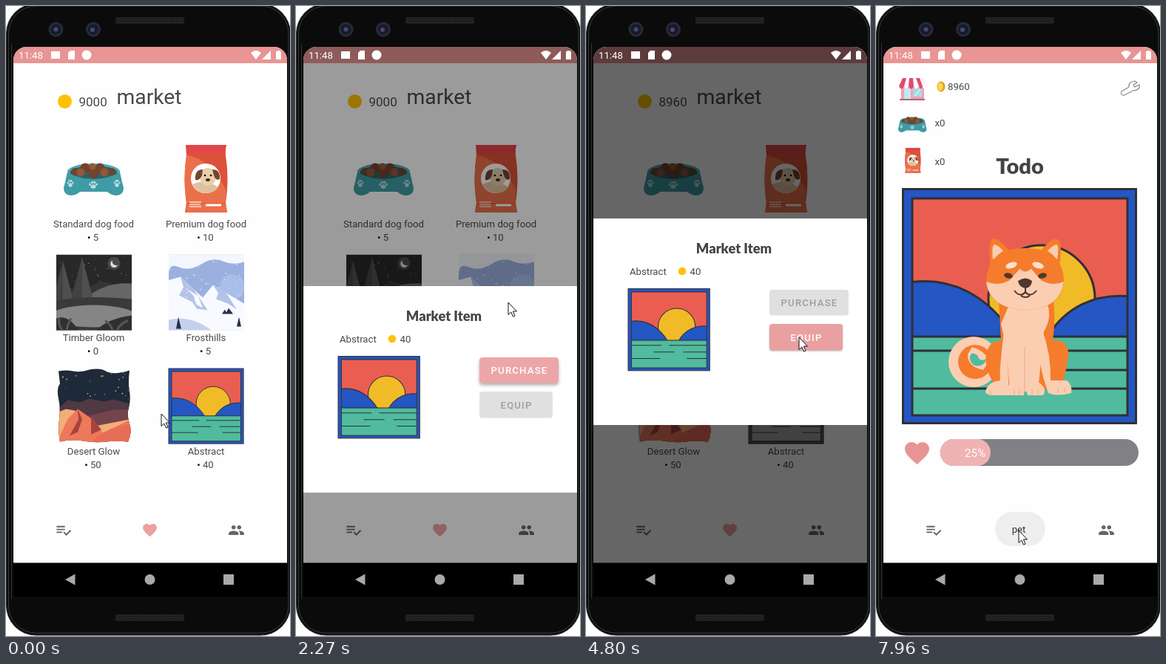
Recreate the animation shown at these times as an HTML page. Size 384 px wide and 848 px high, loop 7.99 s.

```html
<!DOCTYPE html>
<html lang="en">
<head>
<meta charset="utf-8">
<title>Pet market</title>
<style>
html, body { margin: 0; width: 100%; height: 100%; overflow: hidden; background: #fff; }
svg { display: block; width: 100vw; height: 100vh; }
text { font: 13.2px Roboto, sans-serif; fill: #4a4a4a; }
.mid { text-anchor: middle; }
.hand { font: 900 18.3px Lato, sans-serif; fill: #444; }
.btn rect { fill: #eaa0a1; filter: drop-shadow(0 1px 1px rgba(0,0,0,.28)); }
.btn text { font-weight: 500; letter-spacing: 1.18px; fill: #fff; }
.btn.press rect { fill: #eda6a7; filter: drop-shadow(0 3px 2px rgba(0,0,0,.3)); }
.btn.off rect { fill: #e0e0e0; filter: none; }
.btn.off text { fill: #9d9d9d; }
.owned { filter: grayscale(1); }
</style>
</head>
<body>
<svg viewBox="0 0 384 848" preserveAspectRatio="none">
<defs>
  <clipPath id="screen"><path d="M10 795V73A18 18 0 0 1 28 55H362A18 18 0 0 1 380 73V795Z"/></clipPath>
  <clipPath id="square"><rect width="102" height="102"/></clipPath>
  <clipPath id="pane"><rect x="14" y="14" width="291" height="292"/></clipPath>
  <clipPath id="torn"><path d="M2 3Q12 1 22 3T44 1T66 3T98 2Q96 18 98 30T97 52T98 74T96 98Q80 96 66 98T36 97T4 98Q1 82 3 68T2 40T4 20Z"/></clipPath>
  <clipPath id="track"><rect x="87" y="583" width="268" height="36" rx="18"/></clipPath>
  <pattern id="mesh" width="3" height="3" patternUnits="userSpaceOnUse"><rect width="3" height="3" fill="#1c1c1c"/><circle cx="1" cy="1" r=".8" fill="#333"/></pattern>

  <path id="heart" d="M12 21.35l-1.45-1.32C5.4 15.36 2 12.28 2 8.5 2 5.42 4.42 3 7.5 3c1.74 0 3.41.81 4.5 2.09C13.09 3.81 14.76 3 16.5 3 19.58 3 22 5.42 22 8.5c0 3.78-3.4 6.86-8.55 11.54z"/>
  <g id="paw"><ellipse cy="2" rx="3.6" ry="2.8"/><circle cx="-4.5" cy="-1" r="1.6"/><circle cx="-1.7" cy="-3.6" r="1.7"/><circle cx="1.7" cy="-3.6" r="1.7"/><circle cx="4.5" cy="-1" r="1.6"/></g>

  <g id="bowl">
    <path d="M6 10L0 34Q0 43 9 44Q17 44 22 39H59Q64 44 72 44Q81 43 81 34L75 10Z" fill="#3f9ba4"/>
    <ellipse cx="40.5" cy="12" rx="35.500" ry="11" fill="#4fa9b1"/>
    <ellipse cx="40.5" cy="13" rx="32" ry="9" fill="#29646d"/>
    <g fill="#73432c"><circle cx="15" cy="12" r="5"/><circle cx="29" cy="7" r="6.500"/><circle cx="49" cy="7" r="6.500"/><circle cx="65" cy="12" r="5"/><circle cx="40" cy="14" r="7"/></g>
    <g fill="#94573a"><circle cx="23" cy="13" r="5.500"/><circle cx="39" cy="5" r="4.500"/><circle cx="55" cy="13" r="5.500"/></g>
    <path d="M5 13Q40 31 76 13L78 22Q40 38 3 22Z" fill="#3f9ba4"/>
    <g fill="#b5dde0"><use href="#paw" x="40" y="30"/><use href="#paw" transform="translate(9 28) scale(.75 1)"/><use href="#paw" transform="translate(72 28) scale(.75 1)"/></g>
  </g>

  <g id="bag">
    <path d="M2 0H57Q55 8 56 14Q61 45 56 78L58 91H1L3 78Q-2 45 3 14Z" fill="#dc5139"/>
    <path d="M3 14Q34 18 56 60V78L58 91H1L3 78Q-2 45 3 14Z" fill="#ea704b"/>
    <path d="M2 0H57Q55 6 56 11H3Q4 6 2 0Z" fill="#e24648"/>
    <path d="M3 79H56" stroke="#c9472f" stroke-width=".7"/>
    <circle cx="29" cy="45" r="20" fill="#fff"/>
    <path d="M11 53Q29 45 46 57Q40 65 29 65T11 53Z" fill="#e0c19d"/>
    <ellipse cx="32" cy="43" rx="11" ry="12" fill="#e9cfac"/>
    <path d="M25 33Q14 33 15 47Q20 49 24 41ZM38 33Q49 33 48 46Q43 49 40 41Z" fill="#74452f"/>
    <circle cx="28" cy="41" r="1.3"/><circle cx="36" cy="41" r="1.3"/><ellipse cx="32" cy="47" rx="3" ry="2" fill="#442d25"/>
    <path d="M7 77H23M7 80H22M7 83H23" stroke="#ffd9cb" stroke-width="1.4"/><path d="M29 81H50" stroke="#fff" stroke-width="3"/>
  </g>

  <g id="night" clip-path="url(#square)">
    <rect width="102" height="102" fill="#282828"/>
    <g id="stars" fill="#aaa"></g>
    <circle cx="78" cy="12" r="8.500" fill="#494949"/><path d="M76 8A5 5 0 1 0 83 14A5 5 0 0 1 76 8Z" fill="#ddd"/>
    <path d="M0 48L12 40L30 52L60 36L102 46V102H0Z" fill="#353535"/>
    <path d="M36 62Q64 36 102 39V68H36Z" fill="#666"/>
    <path d="M9 9L25 68H-6ZM35 4L52 68H18Z" fill="#4f4f4f"/><path d="M9 9V68H-6ZM35 4V68H18Z" fill="#424242"/>
    <path d="M0 62Q45 54 102 60V102H0Z" fill="#3a3a3a"/>
    <ellipse cx="50" cy="83" rx="58" ry="15" fill="#858585"/>
    <path d="M0 86Q16 80 30 102H0ZM54 102Q70 86 102 82V102Z" fill="#303030"/>
    <path d="M8 102Q2 92 4 86M14 102Q16 92 20 86M76 102Q73 93 66 89M82 102Q87 92 97 89" stroke="#555" stroke-width="3" fill="none"/>
  </g>

  <g id="winter" clip-path="url(#square)">
    <rect width="102" height="102" fill="#9bb0df"/>
    <path d="M0 0H102V10Q86 15 73 9T44 13T14 17T0 26Z" fill="#f3f6fc"/>
    <circle cx="86" cy="44" r="17" fill="#a9bee8"/>
    <path d="M-5 36L16 30L34 47L46 58L60 41L78 52L102 66V102H-5Z" fill="#f8faff"/>
    <path d="M16 30L20 44L14 55L32 64L40 76L56 80L34 47ZM60 41L67 52L64 60L80 66L92 74L78 52Z" fill="#b3c3e8"/>
    <path d="M24 46L34 56L37 67L46 72L40 56Z" fill="#f8faff"/>
    <path d="M0 72Q40 70 102 84V102H0Z" fill="#f8faff"/>
    <path d="M0 88Q30 81 58 102H0Z" fill="#c4d0ec"/>
    <g id="snow" fill="#fff" opacity=".8"></g>
    <path d="M10 100L13 84L17 100ZM72 80L76 74L78 78L81 72L87 80ZM92 97L95 84L98 97Z" fill="#253148"/>
  </g>

  <g id="canyon" clip-path="url(#torn)">
    <rect width="102" height="102" fill="#1e293a"/>
    <g id="sparks" fill="#f2ca68"></g>
    <path d="M0 56L14 42L31 45L44 40L63 44L76 41L102 48V102H0Z" fill="#503943"/>
    <path d="M40 64L55 60L77 55L102 54V102H40Z" fill="#75434a"/>
    <path d="M0 59L12 54L24 56L46 78L102 67V102H0Z" fill="#f2ae79"/>
    <path d="M0 99L14 68L28 54L44 65L62 86L102 67V102H0Z" fill="#ec7959"/>
    <path d="M28 54L34 68L28 85L17 90L29 68ZM46 64L60 82L46 88Z" fill="#a7443e"/>
    <path d="M42 102Q68 76 102 75V102Z" fill="#e86d59"/>
  </g>

  <g id="abstract" stroke="#303036" stroke-width="3">
    <rect x="1.500" y="1.500" width="315" height="315" fill="#2456c4"/>
    <g clip-path="url(#pane)">
      <rect width="318" height="318" fill="#ea5e51"/>
      <circle cx="189" cy="149" r="72" fill="#f1bb27"/>
      <path d="M10 127C65 119 115 142 154 202H10Z" fill="#2456c4"/>
      <path d="M196 202C220 160 262 141 310 146V202Z" fill="#2456c4"/>
      <rect x="5" y="200" width="310" height="130" fill="#50bb9e"/>
      <path d="M14 219H130M160 219H305M100 245H180M215 245H305M14 270H125M228 270H305"/>
    </g>
    <rect x="14" y="14" width="291" height="292" fill="none"/>
  </g>

  <g id="dog">
    <circle cx="132" cy="479" r="34" fill="#fbceb2"/>
    <circle cx="134" cy="479" r="23" fill="#f57c2c"/>
    <path d="M130 459Q147 464 153 477L145 490Q123 485 124 469Z" fill="#fbceb2"/>
    <path d="M127 472A11 11 0 1 0 149 475Q140 480 137 470Q129 464 127 472Z" fill="#50bb9e"/>
    <path d="M166 394H240Q243 425 239 450Q262 449 260 472Q257 491 252 510L224 518L181 519L160 509Q143 484 151 462Q157 449 169 451Z" fill="#f57c2c"/>
    <path d="M180 402H232Q238 420 227 438L219 519H181Q176 452 169 428Z" fill="#fbceb2"/>
    <path d="M174 431Q166 492 168 504Q151 506 148 519Q148 524 160 524H180Q178 484 176 450ZM224 434Q237 468 236 504H258Q266 510 264 521Q244 526 233 521Q225 499 222 480Z" fill="#fbceb2"/>
    <path d="M180 510Q171 523 182 524H200Q201 518 201 480Q202 518 205 524H226Q232 514 220 507Z" fill="#fbceb2"/>
    <path d="M201 458V519M187 516V523M194 516V523M211 516V523M219 516V523M155 517V523M246 515V521M255 514V520" stroke="#edb294" stroke-width="1.300"/>
    <path d="M155 350Q151 315 159 313Q168 313 181 331ZM248 350Q253 316 245 314Q236 312 222 331Z" fill="#f57c2c"/>
    <path d="M158 341Q156 322 160 321Q167 322 174 333ZM245 341Q248 322 244 321Q236 323 230 333Z" fill="#fbceb2"/>
    <path d="M170 331Q202 321 234 331Q255 346 254 374Q248 408 202 409Q155 408 149 374Q148 346 170 331Z" fill="#f57c2c"/>
    <path d="M149 371Q165 378 181 369L194 354Q202 349 210 354L223 369Q239 378 254 371Q249 408 202 409Q154 408 149 371Z" fill="#fbceb2"/>
    <path d="M194 353Q202 362 210 353V344H194Z" fill="#f57c2c"/>
    <g fill="#fbe0d0"><ellipse cx="183" cy="349" rx="8" ry="4" transform="rotate(-18 183 349)"/><ellipse cx="219" cy="349" rx="8" ry="4" transform="rotate(18 219 349)"/></g>
    <g fill="#4e382f"><ellipse cx="179" cy="363" rx="6" ry="3.500" transform="rotate(12 179 363)"/><ellipse cx="225" cy="363" rx="6" ry="3.500" transform="rotate(-12 225 363)"/><path d="M192 370Q202 363 211 370Q210 379 202 380Q193 378 192 370Z"/></g>
    <path d="M187 383Q195 393 202 385Q209 393 217 383M202 379V386M196 390Q202 394 208 390" fill="none" stroke="#4e382f" stroke-width="2"/>
  </g>

  <g id="shop">
    <rect x="3" y="10" width="31" height="20" fill="#f2a0b5"/>
    <rect x="7" y="14" width="9" height="16" fill="#c4e8ef"/><rect x="19" y="14" width="12" height="11" fill="#a6dbe8"/><path d="M21 24L29 15" stroke="#fff"/>
    <rect x="1" y="28" width="34" height="2" fill="#a86c7d"/>
    <path d="M5 0H31L36 11H0Z" fill="#e3496f"/>
    <path d="M10 0H14L13 11H7ZM19 0H23L27 11H20ZM28 0H31L36 11H32Z" fill="#fff"/>
    <path d="M0 11H7Q3.500 18 0 11ZM13 11H20Q16.500 18 13 11ZM27 11H32Q30 18 27 11Z" fill="#e3496f"/>
    <path d="M7 11H13Q10 18 7 11ZM20 11H27Q23.500 18 20 11ZM32 11H36Q34 18 32 11Z" fill="#fff"/>
  </g>
</defs>

<rect width="384" height="848" fill="#fff"/>
<rect x=".5" y="-3" width="384" height="850" rx="40" fill="#0b0b0b" stroke="#2d2d2d"/>
<rect x="3.500" y="0" width="378.500" height="844" rx="37" fill="none" stroke="#3c3c3c"/>
<path d="M7.500 50V798" stroke="#333"/>
<rect x="148" y="15" width="93" height="9" rx="2" fill="url(#mesh)"/><rect x="148" y="819" width="93" height="9" rx="2" fill="url(#mesh)"/>
<g stroke="#292a36" stroke-width="3" fill="#171a2e"><circle cx="67.500" cy="31.500" r="8.500"/><circle cx="118" cy="31.500" r="8.500"/></g>
<g fill="#454b6b"><circle cx="67.500" cy="31.500" r="3"/><circle cx="117" cy="32" r="3"/></g>

<g clip-path="url(#screen)">
  <rect x="10" y="55" width="370" height="695" fill="#fefefe"/>
  <rect x="10" y="55" width="370" height="22" fill="#e89594"/>
  <rect x="10" y="749.500" width="370" height="46"/>

  <g id="market">
    <circle cx="79.500" cy="128.500" r="9.500" fill="#ffc107"/>
    <text class="coins" x="98.500" y="135" style="font-size:17px"></text>
    <text x="149.500" y="132" style="font-size:28.300px">market</text>
    <use href="#bowl" x="78" y="211"/>
    <use href="#bag" x="241" y="187"/>
    <use href="#night" x="68" y="334.500"/>
    <use href="#winter" x="220" y="334.500"/>
    <use href="#canyon" x="69" y="488.500"/>
    <use id="thumb" href="#abstract" transform="translate(219.500 487.500) scale(.321)"/>
    <g id="labels"></g>
  </g>

  <g id="home">
    <use href="#shop" x="31" y="97"/>
    <ellipse cx="88" cy="108.500" rx="5.500" ry="7" fill="#dda520"/><ellipse cx="87" cy="108.500" rx="3.500" ry="5.500" fill="#ffd54d"/>
    <text class="coins" x="97" y="113"></text>
    <path d="M332 115L342 109Q341 102 350 101L353 103L348 106L350 109L356 106Q358 113 347 114L336 120Q330 121 332 115Z" fill="#fff" stroke="#888" stroke-width="1.200"/>
    <use href="#bowl" transform="translate(30 149) scale(.475)"/>
    <use href="#bag" transform="translate(39 191) scale(.37)"/>
    <text x="79.500" y="161.500">x0</text><text x="79.500" y="213.500">x0</text>
    <text class="hand mid" x="194.500" y="226" style="font-size:29px">Todo</text>
    <use href="#abstract" x="35" y="245"/>
    <use href="#dog"/>
    <use href="#heart" transform="translate(35.700 582) scale(1.650)" fill="#e99494"/>
    <g clip-path="url(#track)">
      <rect x="87" y="583" width="268" height="36" fill="#808085"/>
      <rect id="fill" x="87" y="583" height="36" rx="18" fill="#f0b3b3"/>
      <text id="percent" y="607" style="font-size:15.100px;fill:#fff">25%</text>
    </g>
  </g>

  <g fill="#666">
    <path transform="translate(66.500 694.200) scale(.943)" d="M14 10H2v2h12zm0-4H2v2h12zM2 16h8v-2H2zm19.500-4.500L23 13l-6.990 7-4.510-4.500L13 14l3.010 3z"/>
    <use href="#heart" transform="translate(183.200 694.200) scale(.943)" fill="#eba1a1"/>
    <path transform="translate(300.200 694.200) scale(.943)" d="M16 11c1.660 0 3-1.340 3-3s-1.340-3-3-3-3 1.340-3 3 1.340 3 3 3zm-8 0c1.660 0 3-1.340 3-3S9.660 5 8 5 5 6.340 5 8s1.340 3 3 3zm0 2c-2.330 0-7 1.170-7 3.500V19h14v-2.500c0-2.330-4.670-3.500-7-3.500zm8 0l-.97.05c1.160.84 1.970 1.970 1.970 3.450V19h6v-2.500c0-2.330-4.670-3.500-7-3.500z"/>
  </g>

  <rect id="dim" x="10" y="55" width="370" height="740"/>
  <g id="dialog">
    <rect x="10" width="370" height="278" fill="#fff"/>
    <text class="hand mid" x="200" y="47">Market Item</text>
    <text x="59" y="75.500">Abstract</text>
    <circle cx="130" cy="71" r="5.300" fill="#ffc107"/><text x="140.500" y="75.500">40</text>
    <use href="#abstract" transform="translate(56.500 94) scale(.35)"/>
    <g id="buy" class="btn"><rect x="248" y="96" width="107" height="34.500" rx="4"/><text class="mid" x="302" y="118">PURCHASE</text></g>
    <g id="equip" class="btn"><rect x="248" y="142" width="99" height="35.500" rx="4"/><text class="mid" x="298" y="164.500">EQUIP</text></g>
  </g>

  <g fill="#fff">
    <text x="17" y="71" style="fill:#fff">11:48</text>
    <rect x="61" y="61" width="12" height="10"/>
    <path d="M87 60H93V72H84V63Z"/><circle cx="109" cy="66" r="6.500"/>
    <path d="M331 63Q338 57 345 63L338 72ZM358 60V72H346ZM365 61H367V60H370V61H372V72H365Z"/>
  </g>
  <g fill="#a9a9a9"><path d="M80 772L93.500 764.500V779.500Z"/><circle cx="194.500" cy="772" r="7"/><rect x="294" y="765" width="14" height="14"/></g>

  <g id="bought"><rect x="99" y="681" width="191" height="46" rx="23" fill="#eee"/><text class="mid" x="194.500" y="709" style="fill:#333">Successfully Purchased!</text></g>
  <g id="hint"><rect x="161" y="681" width="68" height="46" rx="23" fill="#eee"/><text class="mid" x="193" y="709" style="fill:#333">pet</text></g>
</g>
<path id="cursor" d="M0 0V16.500L3.800 13L6.500 19L9 18L6.400 12H11.500Z" fill="#fff" stroke="#111"/>
</svg>

<script>
const LOOP = 7990, SLIDE = 200, REST = 286, TRAVEL = 740;
const $ = id => document.getElementById(id);

const ITEMS = [['Standard dog food', 5], ['Premium dog food', 10], ['Timber Gloom', 0],
  ['Frosthills', 5], ['Desert Glow', 50], ['Abstract', 40]];
$('labels').innerHTML = ITEMS.map(([name, price], i) => {
  const x = 118.5 + i % 2 * 152, y = 298 + (i >> 1) * 153;
  return `<text class="mid" x="${x}" y="${y}">${name}</text>
    <text class="mid" x="${x - 1}" y="${y + 18}"><tspan fill="#000">•</tspan> ${price}</text>`;
}).join('');

let seed = 7;
const rnd = () => (seed = seed * 16807 % 2147483647) / 2147483647;
function scatter(id, count, height, size) {
  let dots = '';
  while (count--) dots += `<circle cx="${rnd() * 102}" cy="${rnd() * height}" r="${size * (.5 + rnd() * .6)}"/>`;
  $(id).innerHTML = dots;
}
scatter('stars', 24, 40, .6);
scatter('snow', 75, 70, .8);
scatter('sparks', 28, 42, .9);

// Rows are [time, ...values]
const PATH = [[30, 210, 549], [150, 205, 546], [300, 222, 538], [520, 242, 543],
  [1200, 242, 543], [1760, 291, 402], [1860, 287, 399], [2320, 287, 399],
  [2790, 277, 542], [3030, 276, 541], [4330, 276, 541], [4800, 288, 446],
  [5200, 288, 446], [5420, 291, 475], [5810, 226, 655], [6630, 193, 706]];
const DIM = [[991, 0], [1150, .6], [2201, .6], [2401, 0], [4169, 0], [4329, .6], [5308, .6], [5508, 0]];
const BOUGHT = [[2830, 0], [3020, 1], [4160, 1], [4370, 0]];
const HINT = [[7500, 0], [7700, 1]];
const HOME = [[7350, 0], [7600, 1]];
const FILL = [[7610, 0], [7960, 68]];
const SHOWN = [[991, 2201], [4141, 5319.5]];

function track(rows, t) {
  const n = rows.findIndex(r => r[0] > t);
  if (n < 1) return rows.at(n).slice(1);
  const a = rows[n - 1], b = rows[n], p = (t - a[0]) / (b[0] - a[0]);
  return a.slice(1).map((v, i) => v + (b[i + 1] - v) * p);
}

function dialogTop(t) {
  const span = SHOWN.find(([open, close]) => t >= open && t < close + SLIDE);
  if (!span) return REST + TRAVEL;
  const away = t < span[1] ? Math.max(0, 1 - (t - span[0]) / SLIDE) : (t - span[1]) / SLIDE;
  return REST + TRAVEL * away * away;
}

const fade = (id, rows, t) => $(id).setAttribute('opacity', track(rows, t)[0]);
const move = (id, x, y) => $(id).setAttribute('transform', `translate(${x} ${y})`);

function draw(now) {
  const t = now % LOOP, paid = t >= 2600;
  move('cursor', ...track(PATH, t));
  move('dialog', 0, Math.round(dialogTop(t)));
  fade('dim', DIM, t);
  fade('bought', BOUGHT, t);
  fade('hint', HINT, t);
  fade('home', HOME, t);
  $('market').setAttribute('opacity', 1 - track(HOME, t)[0]);

  document.querySelectorAll('.coins').forEach(c => c.textContent = paid ? 8960 : 9000);
  $('thumb').classList.toggle('owned', paid);
  $('buy').classList.toggle('off', paid);
  $('equip').classList.toggle('off', !paid);
  $('buy').classList.toggle('press', t > 2010 && !paid);
  $('equip').classList.toggle('press', t > 5020);

  const width = track(FILL, t)[0];
  $('fill').setAttribute('width', width);
  $('percent').setAttribute('x', 87 + (width > 42 ? width - 35 : width + 7));
  requestAnimationFrame(draw);
}
requestAnimationFrame(draw);
</script>
</body>
</html>
```
